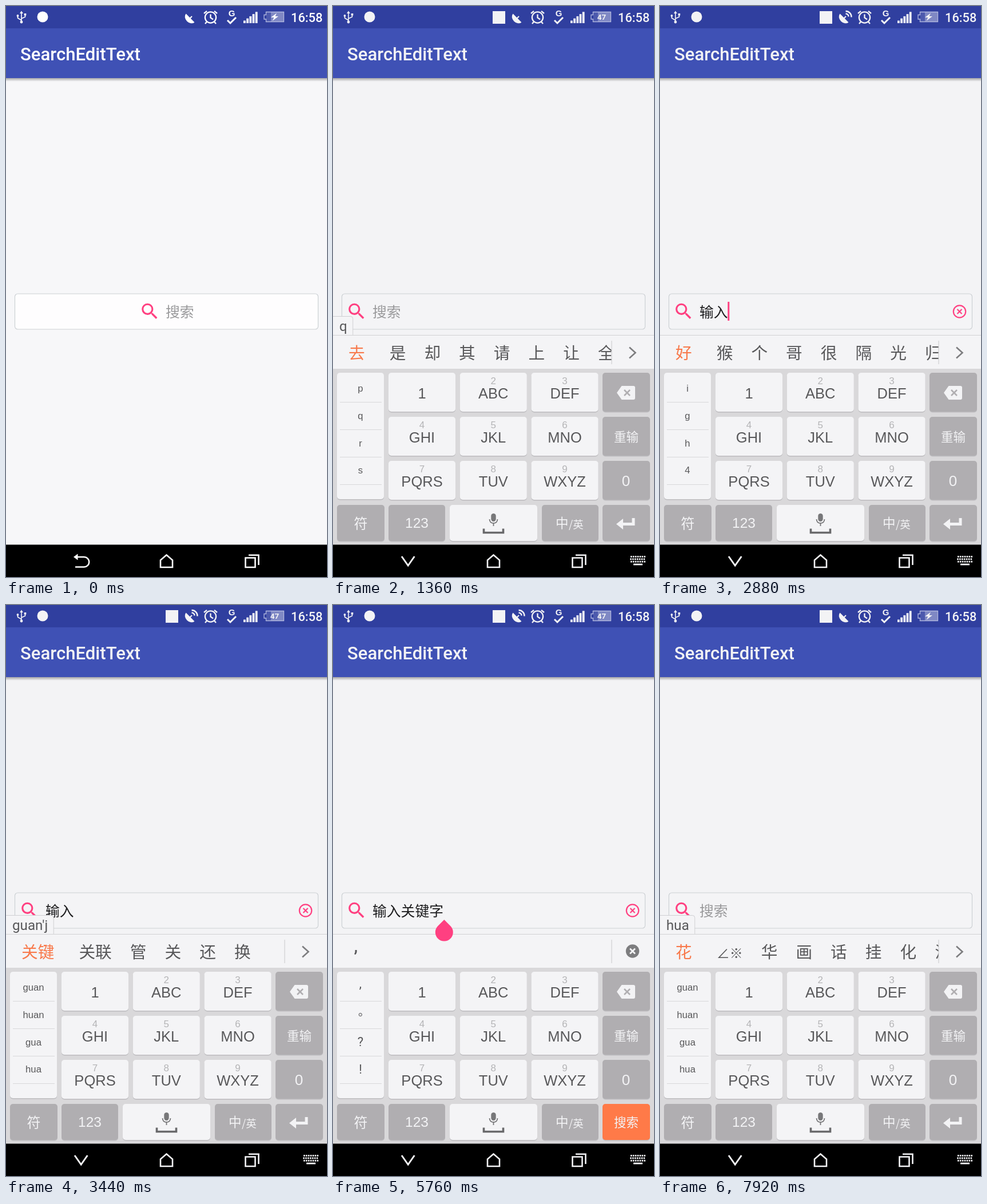
An HTML page with a canvas that plays this animation: 561 px wide and 998 px high, repeating every 8 s.

```html
<!DOCTYPE html>
<html lang="zh">
<head>
<meta charset="utf-8">
<title>SearchEditText</title>
<style>
html, body { margin: 0; width: 100%; height: 100%; overflow: hidden; background: #f3f3f5; }
canvas { display: block; width: 561px; height: 998px; }
</style>
</head>
<body>
<canvas id="stage"></canvas>
<script>
const W = 561, H = 998, LOOP = 8000;
const PINK = '#ff4081', KEY = '#f4f4f6', GREY = '#b0aeb1', INK = '#58585a', ORANGE = '#ff7a48';
const CJK = '"Noto Sans CJK SC", "Noto Sans CJK", sans-serif';
const ARIAL = '"Liberation Sans", Arial, sans-serif';
const ROBOTO = 'Roboto, sans-serif';

const canvas = document.getElementById('stage');
const dpr = window.devicePixelRatio || 1;
canvas.width = W * dpr;
canvas.height = H * dpr;
const c = canvas.getContext('2d');

// Timeline
const FOCUS = 500, IME_BUTTON = 720, KEYBOARD = 1000, CLEAR = 6400, TAP = 5250;
const BLINKS = [FOCUS, 4120, TAP, CLEAR];
const TEXTS = [[0, ''], [2700, '输入'], [4120, '输入关键字'], [CLEAR, '']];
const HUA = '花 ∠※ 华 画 话 挂 化 滑';
const HAO = '好 猴 个 哥 很 隔 光 归';
const GUAN = '关 管 还 换 馆 官 环 欢';
const KEYWORD = '关键字 关键帧 关键 关联 管教';
// time, pinyin, candidates, side list
const INPUT = [
  [0, '', '', ''],
  [1360, 'q', '去 是 却 其 请 上 让 全', 'p q r s'],
  [1560, 'qi', '其 是 起 使 事 期 时 气', 'qi shi pi ri'],
  [1760, 'qiu', '秋 求 书 输 邱 数 淑 球', 'qiu shu pi qi'],
  [2060, "shu'r", '输入 收入 书 输 数 属 树', 'qiu shu pi qi'],
  [2340, "shu'ru", '输入 书 输 数 属 树 熟', 'qiu shu pi qi'],
  [2700, '', ',', ''],
  [2850, '', HAO, 'i g h 4'],
  [2920, 'h', HAO, 'i g h 4'],
  [3030, 'gu', '古 胡 故 股 湖 顾 护 骨', 'gu hu h g'],
  [3150, 'hua', HUA, 'gua hua gu hu'],
  [3270, 'guan', GUAN, 'guan huan gua hua'],
  [3380, "guan'j", '关键 关联 管 关 还 换', 'guan huan gua hua'],
  [3490, "guan'ji", '关机 关键 管 关 还 换', 'guan huan gua hua'],
  [3590, "guan'jia", '管家 关键 管 关 还 换', 'guan huan gua hua'],
  [3690, "guan'jian", '关键 关联 管 关 还 换', 'guan huan gua hua'],
  [3800, "guan'jian'z", KEYWORD, 'guan huan gua hua'],
  [3910, "guan'jian'zi", KEYWORD, 'guan huan gua hua'],
  [4120, '', ',', ''],
  [CLEAR, '', '', ''],
  [6860, 'h', HAO, 'i g h 4'],
  [7220, 'gu', '古 胡 故 股 湖 顾 护 骨', 'gu hu h g'],
  [7560, 'hua', HUA, 'gua hua gu hu'],
  [7860, 'hua', HUA, 'guan huan gua hua']
];

const latest = (list, t) => list.filter(e => e[0] <= t).pop();

function text(s, x, y, font, color, align = 'left') {
  c.font = font;
  c.fillStyle = color;
  c.textAlign = align;
  c.fillText(s, x, y);
}

function rect(x, y, w, h, color) {
  c.fillStyle = color;
  c.fillRect(x, y, w, h);
}

function round(x, y, w, h, r) {
  c.beginPath();
  c.moveTo(x + r, y);
  c.arcTo(x + w, y, x + w, y + h, r);
  c.arcTo(x + w, y + h, x, y + h, r);
  c.arcTo(x, y + h, x, y, r);
  c.arcTo(x, y, x + w, y, r);
  c.closePath();
}

function stroke(d, color, width) {
  c.strokeStyle = color;
  c.lineWidth = width;
  c.stroke(new Path2D(d));
}

function fill(d, color) {
  c.fillStyle = color;
  c.fill(new Path2D(d));
}

function disc(x, y, r, color) {
  c.beginPath();
  c.arc(x, y, r, 0, 7);
  c.fillStyle = color;
  c.fill();
}

function ring(x, y, r, color, width) {
  c.beginPath();
  c.arc(x, y, r, 0, 7);
  c.strokeStyle = color;
  c.lineWidth = width;
  c.stroke();
}

function cross(x, y, a, color, width) {
  stroke(`M${x - a} ${y - a}L${x + a} ${y + a}M${x + a} ${y - a}L${x - a} ${y + a}`, color, width);
}

function dish(waves, color) {
  c.save();
  c.translate(322, 21);
  c.rotate(Math.PI / 4);
  c.beginPath();
  c.ellipse(0, 0, 10.5, 8, 0, 0, Math.PI);
  c.closePath();
  c.fillStyle = color;
  c.fill();
  c.restore();
  stroke('M321 22L325 18', color, 2);
  if (waves) stroke('M324.500 13.500A5 5 0 0 1 329.500 18.500M324.500 9A10 10 0 0 1 334.500 19.500', color, 2.4);
}

function battery(showLevel, color) {
  const edge = '#b1b7de';
  rect(455, 11, 30, 16, '#7f88c4');
  rect(455, 11, 8, 16, '#4d5aad');
  stroke('M454.500 10.500H485.500V27.500H454.500V23H451V15.500H454.500Z', edge, 1.3);
  if (showLevel) text('47', 469.5, 24, `bold 13.5px ${ROBOTO}`, color, 'center');
  else fill('M473 12.500L463 20H468.500L465.500 26L476 18H470.500Z', color);
}

function statusBar(t, color) {
  rect(0, 0, W, 39, '#303f9f');
  stroke('M27 12V27M27 25L20.500 21V17M27 22L33.500 19V15', color, 1.6);
  fill('M27 8.500L30 13H24Z', color);
  disc(27, 28, 2.4, color);
  disc(20.5, 17, 1.9, color);
  rect(31.7, 13, 3.6, 3.6, color);
  disc(64, 19, 9.5, color);
  if (t >= KEYBOARD) rect(279, 9, 22, 22, color);

  const beat = Math.floor((t + 10) / 486.5);
  dish(beat % 2 === 1, color);
  ring(357.5, 20, 9.6, color, 2.3);
  stroke('M357.500 14.500V20.500L362 23.500M346 13L351 8.800M369 13L364 8.800M351 27.500L348 31M364 27.500L367 31', color, 2.3);
  text('G', 394.5, 18, `bold 15px ${ARIAL}`, color, 'center');
  stroke('M387 25L392 30L402 20', color, 3);
  for (let i = 0; i < 5; i++) rect(415 + i * 5.2, 25.5 - i * 3.8, 3.8, 4.5 + i * 3.8, color);
  battery(beat % 4 > 1, color);
  text('16:58', 498, 27.5, `500 21.8px ${ROBOTO}`, color);
}

function appBar(color) {
  const shade = c.createLinearGradient(0, 126, 0, 132);
  shade.addColorStop(0, 'rgba(0,0,0,.32)');
  shade.addColorStop(1, 'rgba(0,0,0,0)');
  rect(0, 126, W, 6, shade);
  rect(0, 39, W, 87, '#3f51b5');
  text('SearchEditText', 25, 94.5, `500 31.1px ${ROBOTO}`, color);
}

const LENS = new Path2D('M15.5 14h-.79l-.28-.27A6.47 6.47 0 0 0 16 9.5 6.5 6.5 0 1 0 9.5 16c1.61 0 3.09-.59 4.23-1.57l.27.28v.79l5 4.99L20.49 19zM9.5 14a4.5 4.5 0 1 1 0-9 4.5 4.5 0 0 1 0 9z');

function field(t, idle) {
  const value = latest(TEXTS, t)[1];
  const shift = idle ? 210 : 0;
  round(15.5, 503, 530, 62, 5);
  c.fillStyle = idle ? '#fefdfe' : '#f4f4f6';
  c.fill();
  c.strokeStyle = '#cdd1d4';
  c.lineWidth = 1.2;
  c.stroke();

  c.save();
  c.translate(22.5 + shift, 515);
  c.scale(1.558, 1.558);
  c.fillStyle = PINK;
  c.fill(LENS, 'evenodd');
  c.restore();

  text(value || '搜索', 69 + shift, 543.5, `24.8px ${CJK}`, value ? '#1c1c1e' : '#9a9a9c');
  if (value) {
    ring(523.5, 534, 10.7, PINK, 2.2);
    cross(523.5, 534, 4, PINK, 2.2);
  }
  if (!idle) {
    const base = BLINKS.filter(b => b <= t).pop();
    const on = (t - base) % 1000 < 500;
    if (on) rect(68.5 + value.length * 24.9, 517, 3, 33, PINK);
  }
}

function handle() {
  c.save();
  c.translate(194.3, 572);
  c.rotate(Math.PI / 4);
  c.beginPath();
  c.arc(0, 0, 15.5, -Math.PI / 2, Math.PI);
  c.lineTo(-15.5, -15.5);
  c.closePath();
  c.fillStyle = PINK;
  c.fill();
  c.restore();
}

function key(x, y, w, h, color = KEY) {
  round(x, y + 1.5, w, h, 5);
  c.fillStyle = '#bdbcbf';
  c.fill();
  round(x, y, w, h, 5);
  c.fillStyle = color;
  c.fill();
}

function candidates(list) {
  rect(0, 575, W, 59, '#f4f4f6');
  rect(0, 575, W, 1, '#d2d2d4');
  if (!list) return;
  rect(486.5, 585, 1, 41, '#c8c8ca');
  if (list === ',') {
    text(',', 40, 606, `500 29px ${ROBOTO}`, INK, 'center');
    disc(523.5, 605, 11.7, '#7d7d7f');
    cross(523.5, 605, 4.5, KEY, 2.8);
    return;
  }
  c.save();
  c.beginPath();
  c.rect(0, 576, 486.5, 58);
  c.clip();
  let x = 27;
  list.split(' ').forEach((word, i) => {
    const size = word[0] === '∠' ? 23 : 28.7;
    text(word, x, 616.5, `${size}px ${CJK}`, i ? INK : '#f8794b');
    x += word.length * size + (i ? 32 : 43);
  });
  c.restore();
  stroke('M518 596.500L528.500 606L518 615.500', '#7d7d7f', 2.6);
}

function sideList(side) {
  key(7, 641, 82, 221);
  for (let i = 0; i < 4; i++) rect(12, 692 + i * 48, 73, 1, '#d8d8da');
  if (side) {
    side.split(' ').forEach((s, i) => text(s, 48, 674 + i * 47.8, `16.7px ${ARIAL}`, INK, 'center'));
    return;
  }
  text(',', 48, 669, `22px ${ROBOTO}`, INK, 'center');
  text('。', 44, 717.5, `20px ${CJK}`, INK);
  text('?', 48, 771, `22px ${ROBOTO}`, INK, 'center');
  text('!', 48, 819, `22px ${ROBOTO}`, INK, 'center');
}

function popup(pinyin) {
  const font = `24.2px ${ROBOTO}`;
  c.font = font;
  const w = c.measureText(pinyin).width + 21;
  round(-6, 542.5, w + 6, 36, 4);
  c.fillStyle = '#f4f4f6';
  c.fill();
  c.strokeStyle = '#cfcfd2';
  c.lineWidth = 1;
  c.stroke();
  text(pinyin, 11, 568, font, INK);
}

function keyboard(t) {
  const [, pinyin, list, side] = latest(INPUT, t);
  const white = '#f3f3f5';
  if (pinyin) popup(pinyin);
  candidates(list);
  rect(0, 634, W, 308, '#d9d8da');
  sideList(side);

  ['1', 'ABC', 'DEF', 'GHI', 'JKL', 'MNO', 'PQRS', 'TUV', 'WXYZ'].forEach((label, i) => {
    const x = 97 + (i % 3) * 124.8, y = 641 + Math.floor(i / 3) * 77;
    key(x, y, 117, 68);
    if (i) text(i + 1, x + 58.5, y + 19.5, `17px ${ARIAL}`, '#b4b4b6', 'center');
    text(label, x + 58.5, y + 44.5, `25.5px ${ARIAL}`, INK, 'center');
  });

  for (let i = 0; i < 3; i++) key(471, 641 + i * 77, 83, 68, GREY);
  fill('M496 676L504.500 664H525Q528 664 528 667V685Q528 688 525 688H504.500Z', white);
  cross(514, 676, 5, GREY, 2.6);
  text('重输', 512.5, 760.5, `21.5px ${CJK}`, white, 'center');
  text('0', 512, 839, `26px ${ARIAL}`, white, 'center');

  key(7, 872, 83, 63, GREY);
  text('符', 48.5, 912.5, `24px ${CJK}`, white, 'center');
  key(97, 872, 99, 63, GREY);
  text('123', 146.5, 912, `24.5px ${ARIAL}`, white, 'center');
  key(204, 872, 153, 63);
  round(276.3, 887, 8.4, 14, 4.2);
  c.fillStyle = '#777779';
  c.fill();
  stroke('M273.500 897Q274 904 280.500 904Q287 904 287.500 897M280.500 904V909', '#777779', 1.8);
  stroke('M263.500 913.500V920.500H297.500V913.500', '#69696b', 3.6);
  key(365, 872, 99, 63, GREY);
  text('中', 389, 912, `22.5px ${CJK}`, white);
  text('/英', 412, 912.5, `18.5px ${CJK}`, white);

  key(471, 872, 83, 63, side ? GREY : ORANGE);
  if (side) {
    stroke('M525 895V905.500H505', white, 5);
    fill('M495 905.500L507 896V915Z', white);
  } else {
    text('搜索', 512.5, 911.5, `21.5px ${CJK}`, white, 'center');
  }
}

function navBar(t, color) {
  rect(0, 941.5, W, 56.5, '#000');
  if (t < IME_BUTTON) {
    stroke('M122 963H136.500A8.700 8.700 0 0 1 136.500 980.500H121', color, 2.6);
    fill('M118 963L125.500 957.500V968.500Z', color);
  } else {
    stroke('M120 962L131.200 978L142.400 962', color, 3);
    for (let r = 0; r < 3; r++)
      for (let i = 0; i < 7; i++)
        rect(520 + i * 3.9 - (r === 1 ? 0.8 : 0), 961 + r * 4.4, 2.6, 2.8, color);
    rect(525, 974.6, 16, 2.8, color);
  }
  stroke('M270 981V968.500L280.500 959.500L291 968.500V981Z', color, 2.6);
  stroke('M418.500 964.500H435.500V981H418.500ZM424 959.700H441.500V977', color, 2.6);
}

function draw(t) {
  const idle = t < FOCUS;
  const color = idle ? '#fff' : '#f3f3f5';
  c.setTransform(dpr, 0, 0, dpr, 0, 0);
  c.textBaseline = 'alphabetic';
  rect(0, 0, W, H, idle ? '#f7f7f9' : '#f3f3f5');
  appBar(color);
  statusBar(t, color);
  field(t, idle);
  if (t >= KEYBOARD) {
    const p = Math.min(1, (t - KEYBOARD) / 200);
    c.save();
    c.globalAlpha = p;
    c.translate(0, 40 * (1 - p) ** 2);
    keyboard(t);
    c.restore();
  }
  if (t >= TAP && t < CLEAR) handle();
  navBar(t, color);
}

const start = performance.now();
function tick() {
  draw((performance.now() - start) % LOOP);
  requestAnimationFrame(tick);
}
tick();
</script>
</body>
</html>
```
